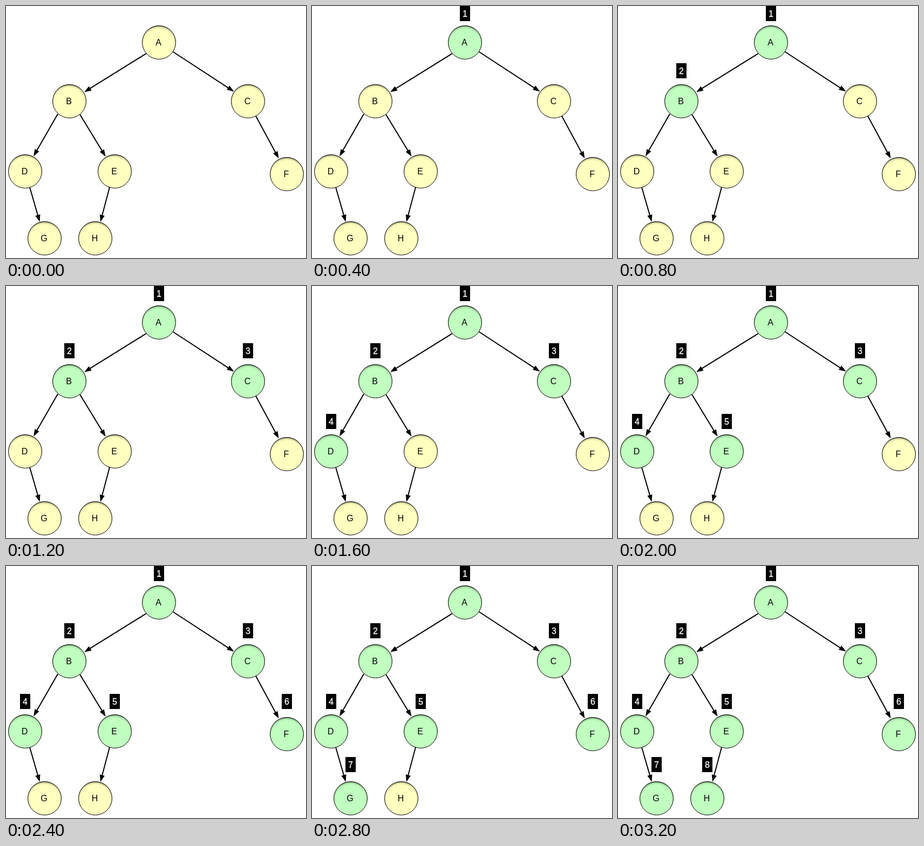
Recreate the animation shown at these times as an HTML page. Size 556 by 467 pixels, loop 3.6 s.

```html
<!DOCTYPE html>
<html lang="en">
<head>
<meta charset="utf-8">
<title>Breadth-first traversal</title>
<style>
  @property --step { syntax: "<number>"; inherits: true; initial-value: 0; }
  html, body { margin: 0; width: 100%; height: 100%; overflow: hidden; background: #fff; }
  svg {
    display: block;
    font: 16px "Liberation Sans", Arial, sans-serif;
    text-anchor: middle;
    animation: visit 3600ms steps(9) infinite;
  }
  @keyframes visit { from { --step: 0; } to { --step: 9; } }
  .edge { stroke: #000; stroke-width: 2; }
  .base { fill: #ffffc0; }
  .visited { opacity: calc(var(--step) - var(--order)); }
  .visited circle { fill: #c0ffc0; }
  .visited text { fill: #fff; stroke: #fff; stroke-width: .3; }
  .rim { fill: url(#shade); stroke: #000; stroke-width: 1; }
</style>
</head>
<body>
<svg id="tree" width="556" height="467" viewBox="0 0 556 467">
  <defs>
    <radialGradient id="shade" cx="0" cy="3" r="34" gradientUnits="userSpaceOnUse">
      <stop offset=".82" stop-opacity="0"/>
      <stop offset=".9" stop-opacity=".08"/>
      <stop offset=".95" stop-opacity=".26"/>
      <stop offset="1" stop-opacity=".6"/>
    </radialGradient>
  </defs>
</svg>
<script>
  // name, centre x, centre y, top of the number tag; listed in visiting order
  const nodes = [
    ["A", 283.5, 67.5, 0],
    ["B", 117.5, 176.5, 106],
    ["C", 448.5, 176.5, 106],
    ["D", 35.5, 306.5, 237],
    ["E", 201.5, 306.5, 237],
    ["F", 520.5, 311.5, 237],
    ["G", 71.5, 430.5, 354],
    ["H", 165.5, 430.5, 354]
  ];
  // start and tip of each arrow
  const edges = [
    [260, 88, 145, 159.5],
    [309, 84.5, 422.5, 158.5],
    [96, 200, 51, 278.5],
    [137, 201, 184.5, 279],
    [463, 204, 505.5, 282.5],
    [44, 336, 62.5, 400],
    [192, 336, 175, 400]
  ];

  function drawEdge([x1, y1, x2, y2]) {
    const length = Math.hypot(x2 - x1, y2 - y1);
    const angle = Math.atan2(y2 - y1, x2 - x1) * 180 / Math.PI;
    return `<g transform="translate(${x1} ${y1}) rotate(${angle})">
      <line class="edge" x2="${length - 10}"/>
      <path d="M${length} 0l-13 -4.7v9.4z"/>
    </g>`;
  }

  function drawNode([name, x, y, top], order) {
    const tag = top - y;
    return `<g transform="translate(${x} ${y})">
      <circle class="base" r="31"/>
      <g class="visited" style="--order:${order}">
        <circle r="31"/>
        <rect x="-9.5" y="${tag}" width="19" height="28"/>
        <text y="${tag + 20}">${order + 1}</text>
      </g>
      <circle class="rim" r="31"/>
      <text x="-1" y="5.5">${name}</text>
    </g>`;
  }

  document.getElementById("tree").insertAdjacentHTML("beforeend",
    edges.map(drawEdge).join("") + nodes.map(drawNode).join(""));
</script>
</body>
</html>
```
